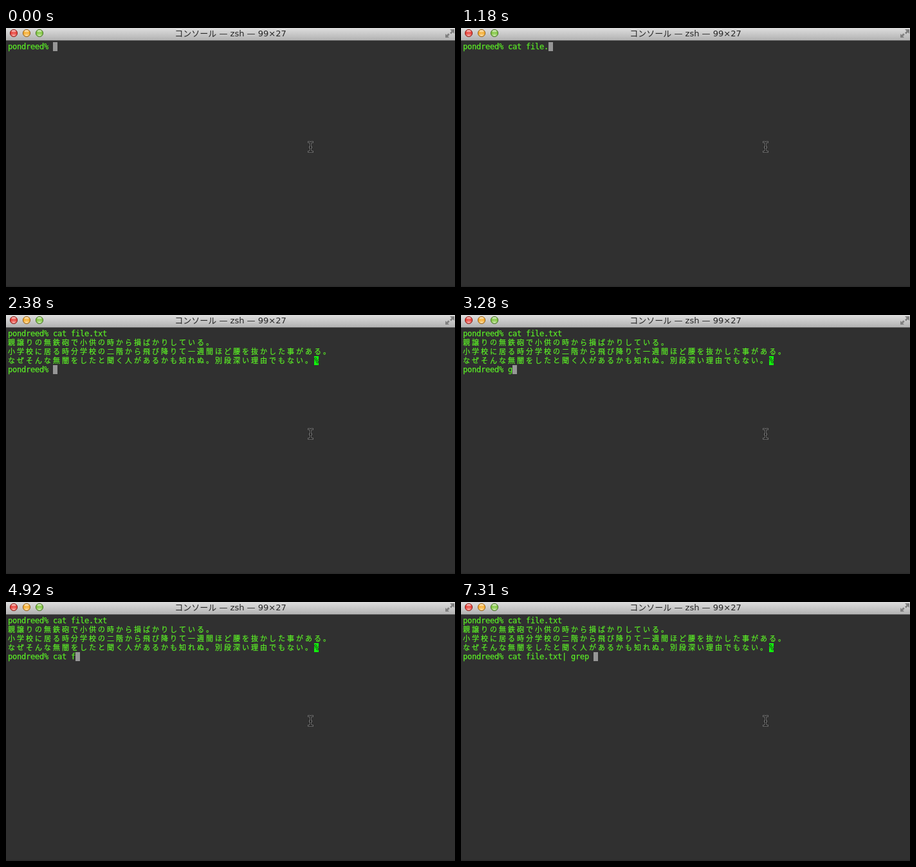
Animation, 698 px wide and 403 px high, one loop 8000 ms. Source, as an HTML page:

```html
<!DOCTYPE html>
<html lang="ja">
<head>
<meta charset="utf-8">
<title>Terminal session</title>
<style>
  html, body { margin: 0; width: 100%; height: 100%; overflow: hidden; background: #303030; }
  svg { display: block; width: 698px; height: 403px; }
  text { white-space: pre; }
  .title { font: 13px "DejaVu Sans", "Noto Sans CJK JP", "Noto Sans CJK", sans-serif; fill: #262626; }
  .term text { font: 12px "DejaVu Sans Mono", monospace; fill: #5aeb26; stroke: #5aeb26; stroke-width: .25px; }
  .term text.wide { font: 11px "Noto Sans CJK JP", "Noto Sans CJK", sans-serif; }
  .term text.mark { fill: #1d331b; stroke: none; }
</style>
</head>
<body>
<svg viewBox="0 0 698 403" xmlns="http://www.w3.org/2000/svg">
  <defs>
    <linearGradient id="bar" x2="0" y2="1">
      <stop offset="0" stop-color="#dedede"/>
      <stop offset="1" stop-color="#b2b2b2"/>
    </linearGradient>
    <linearGradient id="gloss" x2="0" y2="1">
      <stop offset="0" stop-color="#fff" stop-opacity=".85"/>
      <stop offset="1" stop-color="#fff" stop-opacity=".1"/>
    </linearGradient>
    <radialGradient id="glow" cx=".5" cy="1" r=".6">
      <stop offset="0" stop-color="#fff" stop-opacity=".65"/>
      <stop offset="1" stop-color="#fff" stop-opacity="0"/>
    </radialGradient>
  </defs>

  <rect width="698" height="403" fill="#303030"/>
  <rect y="401" width="698" height="2" fill="#2b2b2b"/>

  <rect width="698" height="19" fill="url(#bar)"/>
  <rect y="19" width="698" height="1" fill="#5a5a5a"/>
  <g id="lights"></g>
  <text class="title" x="349" y="13" text-anchor="middle">コンソール — zsh — 99×27</text>
  <path d="M690 2h7v7l-2.3-2.3-2.7 2.7-2-2 2.7-2.7zM683 9v6h6l-2-2 2.7-2.7-2-2-2.7 2.7z" fill="#808080"/>

  <g class="term">
    <rect id="cursor" width="7" height="14" fill="#969696"/>
    <text id="first"></text>
    <g id="output"></g>
    <text id="second"></text>
  </g>

  <g fill="none" stroke-linecap="square">
    <path id="beamEdge" stroke="#8c8c8c" stroke-width="2.6"/>
    <path id="beam" stroke="#0c0c0c" stroke-width="1.2"/>
  </g>
</svg>
<script>
const LOOP = 8000, CELL = 7, ROW = 14, LEFT = 3, TOP = 22;
const PROMPT = "pondreed% ";
const ENTER = 2380;
const NS = "http://www.w3.org/2000/svg";
const $ = id => document.getElementById(id);

const lines = [
  "親譲りの無鉄砲で小供の時から損ばかりしている。",
  "小学校に居る時分学校の二階から飛び降りて一週間ほど腰を抜かした事がある。",
  "なぜそんな無闇をしたと聞く人があるかも知れぬ。別段深い理由でもない。"
];

// Each entry: time in ms, text after the prompt from then on
const firstInput = [
  [0, ""], [300, "c"], [450, "ca"], [590, "cat "], [740, "cat f"], [890, "cat fi"],
  [1030, "cat file"], [1180, "cat file."], [1330, "cat file.t"],
  [1480, "cat file.tx"], [1780, "cat file.txt"]
];
const secondInput = [
  [ENTER, ""], [3280, "g"], [3730, "gre"], [4180, "gr"], [4330, "g"], [4480, ""],
  [4620, "ca"], [4770, "cat "], [4920, "cat f"], [5070, "cat fil"], [5370, "cat file"],
  [5820, "cat file."], [5970, "cat file.tx"], [6120, "cat file.txt "],
  [6420, "cat file.txt|"], [6560, "cat file.txt| "], [6860, "cat file.txt| g"],
  [7010, "cat file.txt| gr"], [7160, "cat file.txt| grep"], [7310, "cat file.txt| grep "]
];

function add(parent, name, attrs) {
  const el = document.createElementNS(NS, name);
  for (const key in attrs) el.setAttribute(key, attrs[key]);
  return parent.appendChild(el);
}

// Writes text on the character grid; wide characters take two cells
function write(el, text, row, col = 0, span = 1) {
  if (el.textContent === text) return;
  el.textContent = text;
  el.setAttribute("x", [...text].map((_, i) => LEFT + (col + i * span) * CELL).join(" "));
  el.setAttribute("y", TOP + row * ROW + 11);
}

function typedAt(input, t) {
  let text = "";
  for (const [time, value] of input) if (time <= t) text = value;
  return text;
}

function buildLights() {
  [["#e8453d", "#852019"], ["#f5ae32", "#94611a"], ["#83c744", "#47702a"]].forEach(([fill, edge], i) => {
    const cx = 12 + i * 20;
    add($("lights"), "circle", { cx, cy: 8, r: 5.6, fill, stroke: edge, "stroke-width": 1 });
    add($("lights"), "circle", { cx, cy: 8, r: 5, fill: "url(#glow)" });
    add($("lights"), "ellipse", { cx, cy: 5.2, rx: 3.4, ry: 2, fill: "url(#gloss)" });
  });
}

function buildOutput() {
  const out = $("output");
  lines.forEach((line, i) => write(add(out, "text", { class: "wide" }), line, i + 1, 0, 2));
  const col = lines[2].length * 2;
  add(out, "rect", { x: LEFT + col * CELL, y: TOP + 3 * ROW, width: CELL, height: ROW, fill: "#10f50c" });
  write(add(out, "text", { class: "mark" }), "%", 3, col);
}

function buildBeam() {
  const d = "M470.5 177.5h1q2 0 2 2v11q0 2 -2 2h-1M476.5 177.5h-1q-2 0 -2 2M473.5 190.5q0 2 2 2h1M472.5 185.5h2";
  $("beam").setAttribute("d", d);
  $("beamEdge").setAttribute("d", d);
}

function render(t) {
  const entered = t >= ENTER;
  const second = entered ? PROMPT + typedAt(secondInput, t) : "";
  const first = PROMPT + typedAt(firstInput, t);
  write($("first"), first, 0);
  write($("second"), second, 4);
  $("output").setAttribute("visibility", entered ? "visible" : "hidden");
  $("cursor").setAttribute("x", LEFT + (entered ? second : first).length * CELL);
  $("cursor").setAttribute("y", TOP + (entered ? 4 : 0) * ROW);
}

buildLights();
buildOutput();
buildBeam();
render(0);

const start = performance.now();
function tick() {
  render((performance.now() - start) % LOOP);
  requestAnimationFrame(tick);
}
requestAnimationFrame(tick);
</script>
</body>
</html>
```
